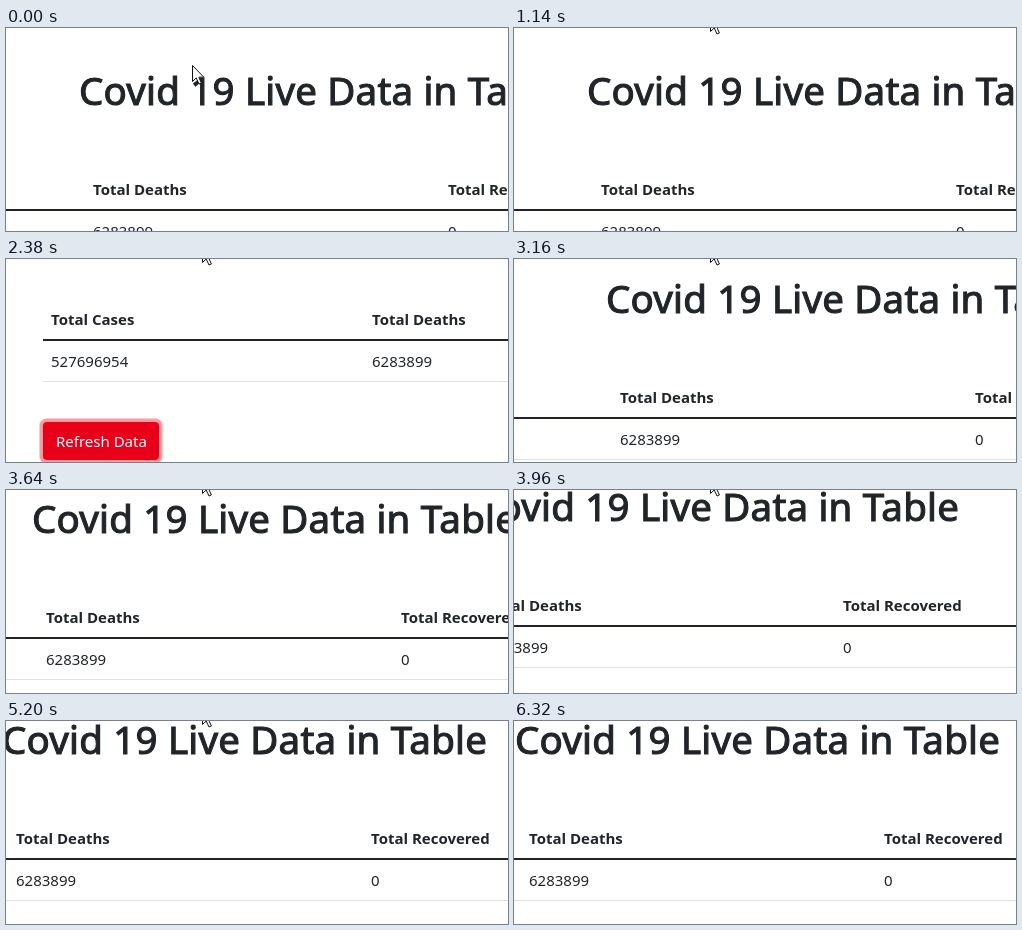
Animation of 502x203 px, one loop 7440 ms. Source, as an HTML page:

```html
<!DOCTYPE html>
<html lang="en">
<head>
<meta charset="utf-8">
<title>Live data table</title>
<style>
  html, body { margin: 0; width: 100%; height: 100%; overflow: hidden; background: #fff; }
  svg { display: block; width: 502px; height: 203px; }
  text { font: 15px "Noto Sans", "Open Sans", sans-serif; fill: #212529; }
  .title { font-size: 38.5px; letter-spacing: .2px; stroke: #212529; stroke-width: 1.1px; }
  .head { font-weight: 700; }
  .label { fill: #fff; }
</style>
</head>
<body>
<svg viewBox="0 0 502 203">
  <!-- The page origin is the baseline of the "Total Deaths" heading. -->
  <g id="page">
    <text class="title" x="-14" y="-90">Covid 19 Live Data in Table</text>
    <text class="head" x="-321">Total Cases</text>
    <text class="head">Total Deaths</text>
    <text class="head" x="355">Total Recovered</text>
    <rect x="-329" y="14" width="1116" height="2" fill="#212529"/>
    <text x="-321" y="41.5">527696954</text>
    <text y="41.5">6283899</text>
    <text x="355" y="41.5">0</text>
    <rect x="-329" y="56" width="1116" height="1" fill="#dee2e6"/>
    <rect x="-332.5" y="93.5" width="123" height="45" rx="7" fill="#ff9a9d"/>
    <rect x="-329" y="97" width="116" height="38" rx="4" fill="#e8001b"/>
    <text class="label" x="-316" y="122">Refresh Data</text>
  </g>
  <path id="cursor" d="M.5 .5V16.5L4.2 13L7 19L9.4 18L6.8 12.2H11.8Z" fill="#fff" stroke="#111"/>
</svg>
<script>
const LOOP = 7440;
const TICK = 20;

// Each move runs in visible steps and ends at x, y; bendX and bendY bow its path.
const page = {
  el: document.getElementById("page"), x: 87, y: 167,
  moves: [
    { from: 1300, to: 1620, steps: 5, x: 352, y: 84 },
    { from: 1780, x: 357, y: 81 },
    { from: 1960, to: 2680, steps: 10, x: 368, y: 52, bendY: 10 },
    { from: 2780, to: 3440, steps: 8, x: 63, y: 137, bendY: 21 },
    { from: 3640, to: 4300, steps: 9, x: -48, y: 121, bendY: -3 },
    { from: 4460, to: 4820, steps: 5, x: -108, y: 117.5 },
    { from: 4960, to: 5300, steps: 5, x: 15, y: 123 }
  ]
};
const cursor = {
  el: document.getElementById("cursor"), x: 186, y: 37,
  moves: [
    { from: 70, to: 510, steps: 7, x: 183, y: -10, bendX: 10 },
    { from: 1140, x: 196, y: -13 },
    { from: 5700, to: 5840, steps: 3, x: 236, y: -20 },
    { from: 6260, x: 442, y: 61 },
    { from: 6320, x: 442, y: -40 }
  ]
};

// Share of a move completed at time t, advancing one step at a time
function progress({ from, to = from, steps = 1 }, t) {
  const gap = steps > 1 ? (to - from) / (steps - 1) : 0;
  let done = 0;
  while (done < steps && from + Math.floor(done * gap / TICK + 1e-6) * TICK <= t) done++;
  return done / steps;
}

const easeOut = k => 1 - (1 - k) ** 2;

function place({ el, x, y, moves }, t) {
  for (const move of moves) {
    const k = progress(move, t);
    const bow = Math.sin(Math.PI * k);
    x += (move.x - x) * easeOut(k) + (move.bendX || 0) * bow;
    y += (move.y - y) * easeOut(k) + (move.bendY || 0) * bow;
  }
  el.setAttribute("transform", `translate(${Math.round(x)} ${Math.round(y)})`);
}

const start = performance.now();
function draw() {
  const t = (performance.now() - start) % LOOP;
  place(page, t);
  place(cursor, t);
  requestAnimationFrame(draw);
}
draw();
</script>
</body>
</html>
```
